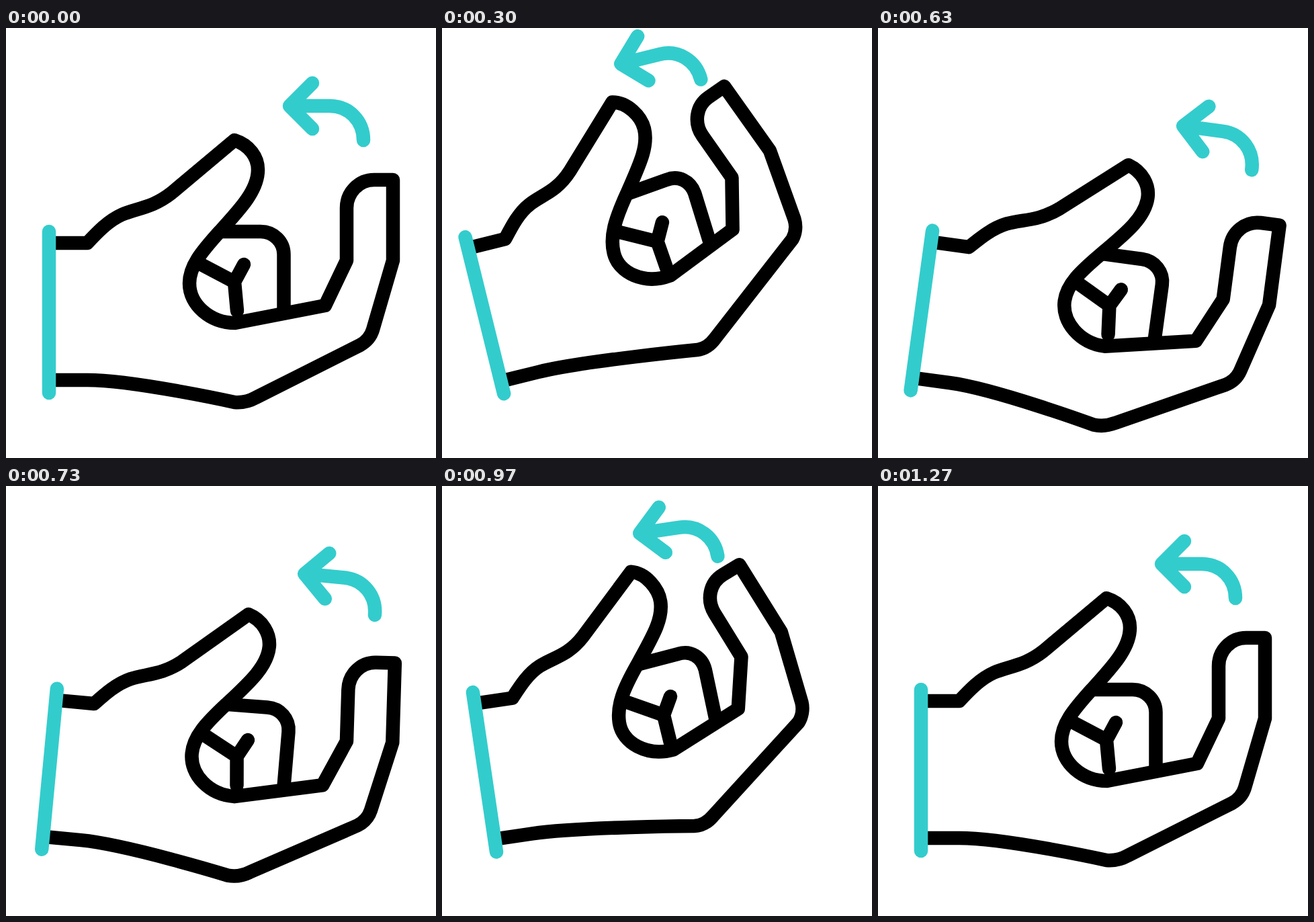
An HTML page that plays this animation: 640 by 640 pixels, repeating every 1670 ms.

```html
<!DOCTYPE html>
<html lang="en">
<head>
<meta charset="utf-8">
<title>Beckoning hand</title>
<style>
  html, body { margin: 0; width: 100%; height: 100%; overflow: hidden; background: #fff; }
  svg { display: block; width: 100%; height: 100%; }
  path { fill: none; stroke-width: 20.5; stroke-linejoin: round; }
  .ink { stroke: #000; }
  .teal { stroke: #33cccc; stroke-linecap: round; }
  .round { stroke-linecap: round; }
</style>
</head>
<body>
<svg viewBox="0 0 640 640">
  <g id="hand">
    <path id="curl" class="ink"/>
    <path class="ink round" d="M285 349L340 378L344 421M340 378L354 352"/>
    <path id="outline" class="ink"/>
    <path class="teal" d="M64 303V543"/>
    <path id="arrow" class="teal" d="M532 167C532 138 510 116 482 116H422M456 82L422 116L456 150"/>
  </g>
</svg>
<script>
const LOOP = 1670, FPS = 30, PIVOT = '83 428';
const $ = id => document.getElementById(id);

// Each shape: [open pose, beckoning pose], same commands in both.
const outline = [
  `M66 320L121 320C136 304 152 287 172 278C195 268 218 268 247 245L340 167
   C362 174 375 192 375 211C375 241 350 268 318 303C290 334 273 355 273 380
   C273 412 304 439 341 439L475 413L507 346L507 268C507 245 525 226 548 226
   L576 226L576 346L546 449C543 459 536 467 527 472L372 550
   C363 555 351 558 340 557C340 557 190 524 121 524L66 524`,
  `M66 320L121 320C136 303 150 287 168 279C190 269 212 270 238 245L323 160
   C345 165 360 191 360 210C360 238 339 262 312 298C287 330 273 353 273 379
   C273 410 306 436 347 431L451 385L467 309L437 239C428 218 436 193 458 184
   L484 173L531 281L546 389C547 400 543 411 537 418L391 537
   C382 545 371 549 361 548C361 548 190 524 121 524L66 524`
];
const curl = [
  'M318 303L379 303C398 303 413.5 318 413.5 337L413.5 424',
  'M312 298L375 291C394 288 409 301 411 320L416 400'
];

const smooth = t => t * t * (3 - 2 * t);
const settle = t => 1 - (1 - t) ** 1.5;
const mix = (a, b, s) => a + (b - a) * s;

// Keys: step, values, optional easing towards the next key
const swing = [          // angle, bend
  [0, [0, 0]],
  [11, [-15.2, 1]],
  [19.6, [8.1, 0]],
  [29, [-8.4, 1], settle],
  [38, [0, 0]]
];
const drift = [          // arrow offset x, y
  [0, [0, 0]],
  [13, [-92, -10]],
  [19.6, [-7.5, -18]],
  [22, [-7.5, -18]],
  [31, [-88, -10]],
  [38, [0, 0]]
];

function sample(keys, k) {
  const i = keys.findIndex(key => key[0] > k);
  if (i < 0) return keys[keys.length - 1][1];
  const [k0, from, ease = smooth] = keys[i - 1];
  const [k1, to] = keys[i];
  const s = ease((k - k0) / (k1 - k0));
  return from.map((v, j) => mix(v, to[j], s));
}

function morph([a, b], s) {
  const ends = b.match(/[\d.]+/g);
  let i = 0;
  return a.replace(/[\d.]+/g, n => mix(+n, +ends[i++], s).toFixed(2));
}

function draw(ms) {
  const k = Math.floor(ms * FPS / 1000 + 0.15);
  const [angle, bend] = sample(swing, k);
  $('hand').setAttribute('transform', `rotate(${angle} ${PIVOT})`);
  $('outline').setAttribute('d', morph(outline, bend));
  $('curl').setAttribute('d', morph(curl, bend));
  $('arrow').setAttribute('transform', `translate(${sample(drift, k)})`);
}

const start = performance.now();
function tick() {
  draw((performance.now() - start) % LOOP);
  requestAnimationFrame(tick);
}
tick();
</script>
</body>
</html>
```
